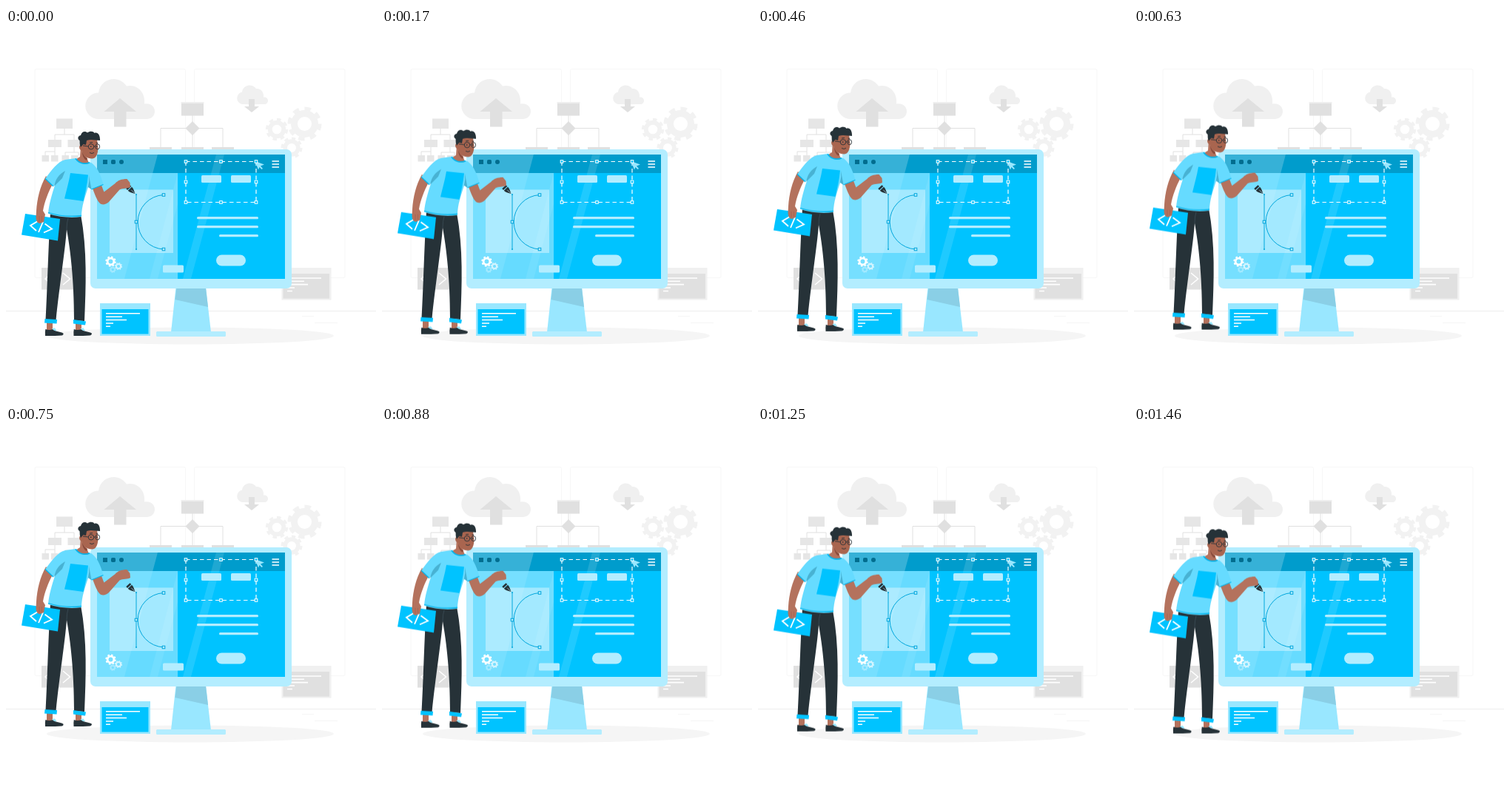
Recreate the animation shown at these times as an HTML page. Size 500x500 px, loop 1500 ms.

```html
<!DOCTYPE html>
<html lang="en">
<head>
<meta charset="utf-8">
<title>Designer at work</title>
<style>
  html, body { margin: 0; width: 100%; height: 100%; overflow: hidden; background: #fff; }
  svg { display: block; width: 100vw; height: 100vh; }
  .main { fill: #00c3ff; }
  .pale { fill: #b3edff; }
  .mid { fill: #99e7ff; }
  .shirt { fill: #66dbff; }
  .dark { fill: #263238; }
  .skin { fill: #b4725d; }
  .grey { fill: #e0e0e0; }
  .line { fill: none; stroke: #fff; stroke-width: 1.6; }
  .wire { fill: none; stroke: #e0e0e0; }
  .node rect { fill: #e6e6e6; }
  .grip { fill: #00c3ff; stroke: #fff; }
  .floating { animation: floating 1.5s linear infinite; }
  @keyframes floating {
    50% { transform: translateY(-10px); }
  }
</style>
</head>
<body>
<svg viewBox="0 0 500 500">
  <defs>
    <g id="gear" fill="none" stroke="currentColor">
      <circle r="14" stroke-width="9"/>
      <circle r="20.3" stroke-width="5.5" pathLength="16" stroke-dasharray="1.05 .95"/>
    </g>
    <rect id="grip" x="-1.8" y="-1.8" width="3.6" height="3.6"/>
  </defs>

  <!-- Wall -->
  <g fill="none" stroke="#f7f7f7">
    <rect x="39" y="55.5" width="203.5" height="282" rx="2"/>
    <rect x="254.5" y="55.5" width="203.5" height="282" rx="2"/>
  </g>
  <path d="M0 382.5H500" stroke="#ededed"/>
  <path d="M400 389.5H416M417 398.5H448" stroke="#f5f5f5"/>

  <!-- Clouds -->
  <g fill="#f0f0f0">
    <path d="M125 123A17.7 17.7 0 0 1 125 87.500C127 75 136 69 146 69C153 69 159 73 163 78.500C177 75 189 87 187 102.500C195 101 201 106 201 112.500C201 119 196 123 190 123Z"/>
    <path d="M319 103A8.400 8.400 0 0 1 319 86.500C320 80 325 77.500 329 77.500C333 77.500 336 79 338 82C344 81 349 87 348 93.500C352 93 354 95.500 354 98C354 101 352 103 349 103Z"/>
  </g>
  <path class="grey" d="M154 95L176 113H162.500V133.500H146V113H132.500ZM328 96H336V106H342L332 114L322 106H328Z"/>

  <!-- Charts -->
  <path class="wire" d="M252 118V164M209 164V135.500H293V164"/>
  <path class="grey" d="M237 101H267V118.500H237ZM252 126L261.500 135.500L252 145L242.500 135.500ZM194 161H224V166H194ZM237 161H267V166H237ZM278 161H308V166H278Z"/>
  <path d="M236.500 101H267.500" stroke="#eee" stroke-width="2"/>
  <path class="wire" d="M79 136V144M66 151V144H92V151M66 161V167M53 172V167H66V172M92 161V168M80 172V168H98V172"/>
  <g class="node">
    <rect x="68" y="122.500" width="22" height="13.500"/>
    <rect x="57" y="151" width="18" height="10"/>
    <rect x="83.500" y="151" width="18" height="10"/>
    <rect x="48.500" y="172" width="9.500" height="8.500"/>
    <rect x="61" y="172" width="9.500" height="8.500"/>
    <rect x="75.500" y="172" width="9.500" height="8.500"/>
    <rect x="88" y="172" width="9.500" height="8.500"/>
  </g>

  <g color="#f2f2f2">
    <use href="#gear" transform="translate(403.500 129.500)"/>
    <use href="#gear" transform="translate(366 137) scale(.66)"/>
    <use href="#gear" transform="translate(386 162) scale(.63)"/>
  </g>

  <!-- Grey windows -->
  <rect class="grey" x="48" y="324" width="43.500" height="29.500"/>
  <path class="line" d="M62 331L53 339L62 347M77 331L86.500 339L77 347" stroke="#f5f5f5"/>
  <rect x="372.500" y="324" width="67" height="43.500" fill="#f0f0f0"/>
  <rect class="grey" x="374.500" y="332" width="62.500" height="33.500"/>
  <path class="line" stroke-width="1.400" d="M380 338H426M380 342.300H403M380 346.600H408M380 351H390M380 355.500H387"/>

  <ellipse cx="249" cy="416" rx="194" ry="11.500" fill="#f5f5f5"/>

  <!-- Monitor -->
  <path class="mid" d="M229.500 351H270L277 411H223Z"/>
  <path d="M230.500 351H270L273 377L228.500 367Z" fill="#8acfe6"/>
  <rect class="pale" x="203" y="410" width="94" height="7" rx="1.500"/>
  <rect class="pale" x="114" y="164" width="272" height="188" rx="7"/>
  <rect class="main" x="123" y="171" width="254" height="168"/>
  <rect class="shirt" x="123" y="196" width="109" height="143"/>
  <rect x="123" y="171" width="254" height="25" fill="#009ccc"/>
  <rect class="pale" x="140" y="218.500" width="86" height="85.500" opacity=".8"/>
  <g fill="#fff">
    <path d="M123 171H205L160 339H123Z" opacity=".1"/>
    <path d="M123 171H205L198.300 196H123Z" opacity=".12"/>
    <path d="M232 196L194 339H205L232 238Z" opacity=".08"/>
    <path d="M284 171H295L250 339H239Z" opacity=".12"/>
  </g>
  <g fill="#006d8f">
    <rect x="131" y="178" width="6" height="6"/>
    <rect x="142" y="178" width="6" height="6" rx="1.800"/>
    <circle cx="156" cy="181" r="3"/>
  </g>
  <path class="line" d="M359.500 180H369M359.500 184H369M359.500 188H369"/>

  <!-- Page layout -->
  <rect class="line" x="243" y="180.500" width="95" height="55" style="stroke-width:1.200" stroke-dasharray="5.500 4"/>
  <path class="mid" d="M336.500 180L349 184.500L344 186.500L347 190L345.500 191L342.500 188L341 191.500Z"/>
  <g class="grip">
    <use href="#grip" x="243" y="180.500"/><use href="#grip" x="290.500" y="180.500"/>
    <use href="#grip" x="338" y="180.500"/><use href="#grip" x="243" y="208"/>
    <use href="#grip" x="338" y="208"/><use href="#grip" x="243" y="235.500"/>
    <use href="#grip" x="290.500" y="235.500"/><use href="#grip" x="338" y="235.500"/>
  </g>
  <g class="pale">
    <rect x="264" y="199" width="27" height="10" rx="1.500"/>
    <rect x="304" y="199" width="27" height="10" rx="1.500"/>
    <rect x="258" y="255" width="83" height="3.200" rx="1.500"/>
    <rect x="258" y="267" width="83" height="3.200" rx="1.500"/>
    <rect x="288" y="279" width="53" height="3.200" rx="1.500"/>
    <rect x="284" y="306.500" width="40" height="15" rx="7.500"/>
    <rect x="212" y="320.500" width="28" height="10" rx="1.500"/>
  </g>

  <!-- Curve -->
  <g fill="#b3edff" stroke="#00a6dc">
    <path fill="none" d="M176 225V299M213 225.500A36.800 36.800 0 0 0 213 299"/>
    <use href="#grip" x="213" y="225.500"/>
    <use href="#grip" x="176" y="262"/>
    <use href="#grip" x="213" y="299"/>
    <circle cx="176" cy="225" r=".7"/><circle cx="176" cy="299" r=".7"/>
  </g>
  <use href="#gear" color="#fff" transform="translate(141.500 315.500) scale(.31)"/>
  <use href="#gear" color="#d5f5ff" transform="translate(152 322) scale(.22)"/>
  <use href="#gear" color="#a6eaff" transform="translate(144.300 326.500) scale(.19)"/>

  <!-- Pen -->
  <path class="dark" d="M162.300 217L167.500 212.300L169.300 214L164 219Z"/>
  <path class="dark" d="M164.700 219.800L170 214.700C172.300 217 173.200 220 174.500 224C171 223.200 167.500 222.500 164.700 219.800Z"/>
  <path d="M174 223.500L169.300 218.800" stroke="#b3edff" stroke-width=".7"/>

  <!-- Small window -->
  <rect class="mid" x="127" y="372" width="68" height="44"/>
  <rect class="main" x="129.500" y="380" width="63" height="33.500"/>
  <path class="line" d="M135 385.700H181M135 390.200H157M135 394.500H163M135 399H145M135 403.300H141"/>

  <!-- Man -->
  <g class="floating">
    <path class="skin" d="M55 398H63V408H55ZM94 399H102V408H94Z"/>
    <path class="mid" d="M62 406L66 405.500L68.500 409L64 409.500ZM100.500 406L104.500 405.500L107 409L102.500 409.500Z"/>
    <path class="dark" d="M53.300 407Q58 409 63 407.300C67 411 74 410 77.500 412.700Q78 415 75 415.500L66 416H53Q52.500 411 53.300 407ZM91.800 407Q96 409 101.500 407.300C105.500 411 112.500 410 116 412.700Q116 415 113 415.500L104 416H91.500Q91 411 91.800 407Z"/>
    <path class="dark" d="M60 250C57 300 56 350 53.500 394.500L67.500 395C72 350 80 300 82 272C87 300 92 340 92 395L106 396C108 350 110 300 101 252Z"/>
    <path d="M82 272Q82 263 84 257" fill="none" stroke="#455a64" stroke-width=".6"/>
    <path class="main" d="M52.500 393L69 394L68.500 399.500L52 398.500ZM91 394L108 396.500L107 401.500L91 399.500Z"/>

    <path class="main" d="M26 251L73 258L70 287.500L21 279.500Z"/>
    <path class="line" style="stroke-width:1.900" d="M43 261L33 267L41 274M50 262L44 276M52.500 264.500L62 271.500L51 276.500"/>

    <path class="skin" d="M54 200C46 214 42 231 41 247L40.500 256C41 262 43 264 46 264L51 262L53 252L50 247C52 235 57 222 63 211Z"/>
    <path d="M45 254V262M48.500 254V261" stroke="#9a5b49" stroke-width=".5"/>
    <path class="skin" d="M116 214C120 225 122.500 232 126.500 236.500C130 240 135 238.500 139 235L153.500 218.500C158 216 164 217.500 168 215L167.500 209L163.500 204C156 204 151 206 147.500 210L132.500 221.500C131 218 130 215 128 210Z"/>

    <path class="shirt" d="M94 176L80 178C70 180 61 193 53 203.500L64 214L66.500 211C62 225 58 238 57 251Q80 258 102 255C102 241 107 228 111 215L115.500 218L131.500 211.500C128 198 122 184 112.500 181Z"/>
    <path d="M65 214C67 204 71 198 80 193L76 203Z" fill="#48b2d3"/>
    <path d="M111 215Q113 207 112 199L115.500 218Z" fill="#48b2d3"/>
    <path class="main" d="M87 196L111 198.500C110 211 107 223 104.500 234L79 230.500C82 218 85 208 87 196Z"/>
    <path d="M53 203.500L64 214M115.500 218L131.500 211.500M57 249.500Q80 256.500 102 253.500" fill="none" stroke="#00b5ed" stroke-width="1.300"/>

    <path class="skin" d="M101 160L100 174Q96 176 95 178Q104 186 112 183L110 177Z"/>
    <path d="M94 176.500Q101 186 113 182" fill="none" stroke="#00b5ed" stroke-width="1.800"/>
    <path d="M102 151C104 147 121 146 123 151C124 156 124 159 124.500 163C124 170 122 176 117 176.500C110 177 105 173 103 166C98 165 98 158 102 157Z" fill="#a9654f"/>
    <path d="M103 167Q105 174 110 176L108.500 179Q103 175 103 167Z" fill="#894b3b"/>
    <path class="dark" d="M101 161C99 157 100 155 99.500 152C96 150 97 146 101 145C102 140 107 138.500 110 141.500C113 139 118 139 119.500 142C124 140 127.500 145 127 152C121 152 115 150 109 152L108 158L104.500 157Z"/>
    <g fill="none" stroke="#263238" stroke-width=".9">
      <circle cx="115" cy="160.300" r="3.700"/>
      <ellipse cx="123.700" cy="160.300" rx="2.900" ry="3.500"/>
      <path d="M104 159L111.300 160M118.700 160H120.800M113 155L117 154.500M121.500 155L124 155.500M113 168.500Q116 170.500 119 168.500"/>
    </g>
    <path d="M114.700 159.500V161M122.700 159.500V161" stroke="#263238" stroke-width="1.300"/>
  </g>
</svg>
</body>
</html>
```
